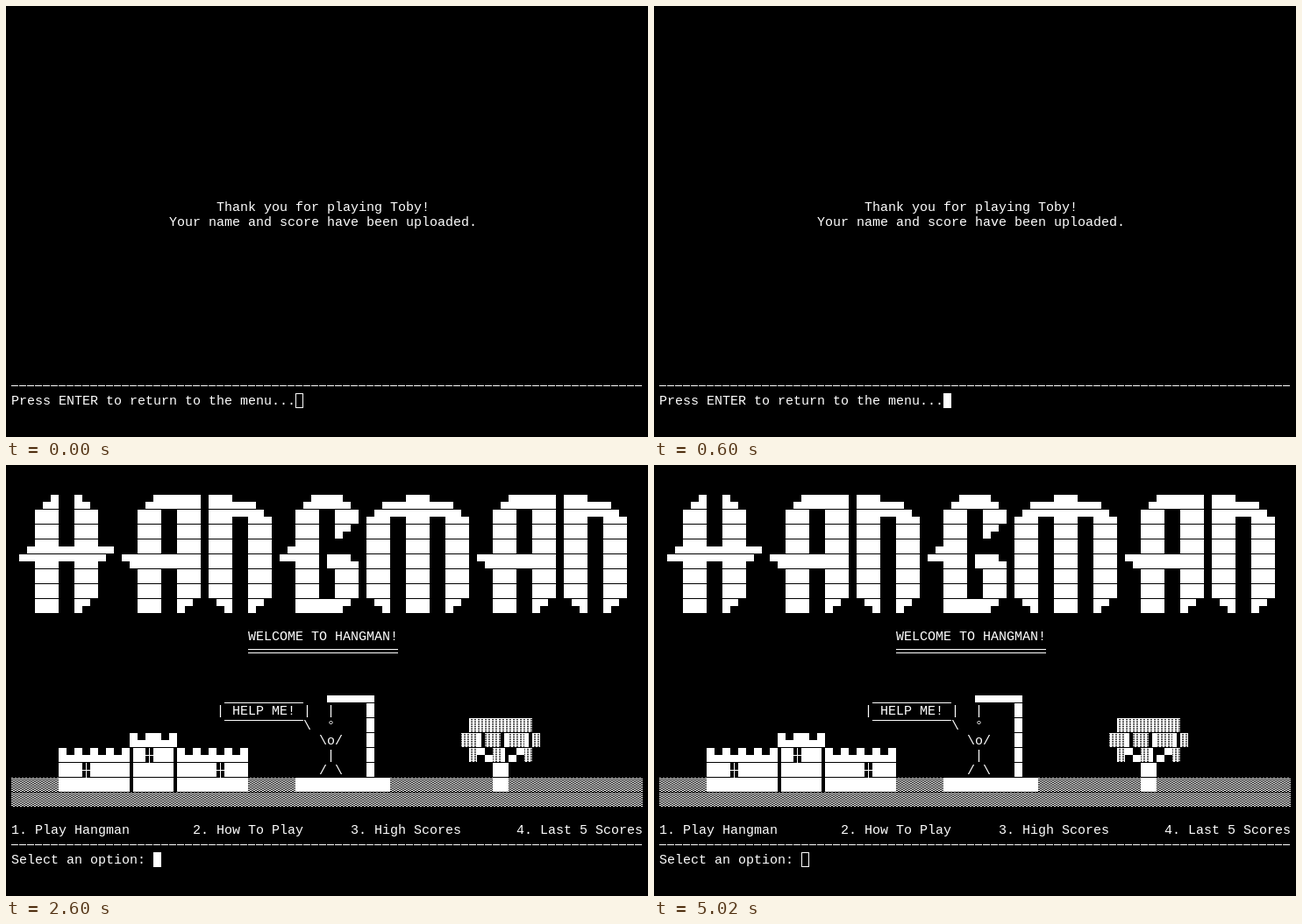
Recreate the animation shown at these times as an HTML page with a canvas. Size 732 by 492 pixels, loop 5.14 s.

```html
<!DOCTYPE html>
<html lang="en">
<head>
<meta charset="utf-8">
<title>Hangman</title>
<style>
html, body { margin: 0; height: 100%; overflow: hidden; background: #000; }
canvas { display: block; }
</style>
</head>
<body>
<canvas width="732" height="492"></canvas>
<script>
const LEFT = 6, CELL_W = 9, CELL_H = 17, LOOP = 5140;
const ctx = document.querySelector('canvas').getContext('2d');

// Drawn characters as [x, y, w, h] boxes; blocks leave a one-pixel seam below
const BLOCKS = {
  '█': [[0, 0, 9, 16]],
  '▀': [[0, 0, 9, 8]],
  '▄': [[0, 8, 9, 8]],
  '▌': [[0, 0, 5, 16]],
  '▐': [[4, 0, 5, 16]],
  '┼': [[0, 8, 9, 1], [4, 0, 1, 17]],
  '_': [[0, 16, 9, 1]],
  '‾': [[0, 2, 9, 1]],
  '-': [[0, 8, 8, 1]],
  '=': [[0, 6, 9, 1], [0, 10, 9, 1]]
};

const H = `
   ▄█  █▄
  ███  ███
  ███  ███
 ▄███▄▄███▄▄
▀▀███▀▀███▀
  ███  ███
  ███  ███
  ███  █▀`;
const A = `
   ▄██████
  ███  ███
  ███  ███
  ███  ███
▀█████████
  ███  ███
  ███  ███
  ███  █▀`;
const N = `
███▄▄▄
███▀▀██▄
███  ███
███  ███
███  ███
███  ███
███  ███
 ▀█  █▀`;
const G = `
   ▄████▄
  ███  ███
  ███  █▀
 ▄███
▀▀███ ███▄
  ███  ███
  ███  ███
  ██████▀`;
const M = `
  ▄▄▄███▄▄▄
▄██▀▀███▀▀██▄
███  ███  ███
███  ███  ███
███  ███  ███
███  ███  ███
███  ███  ███
 ▀█  ███  █▀`;

const CASTLE = `
         █▄██▄█
█▄█▄█▄█▄█▐█┼██▌█▄█▄█▄█▄█
███┼█████▐████▌█████┼███
█████████▐████▌█████████`;
const BUBBLE = `
 __________
| HELP ME! |
 ‾‾‾‾‾‾‾‾‾‾\\`;
const GALLOWS = `
 ▄▄▄▄▄▄
 |    █
 °    █
\\o/   █
 |    █
/ \\   █`;
const TREE = `
 ▓▓▓▓▓▓▓▓
▓▓▌▓▓▐▓▓▌▓
 ▓▀▄▓▌▄▀▓
    ██
    ██`;

// Each item: column, row, text
const RULE = [0, 25, '-'.repeat(80)];
const goodbye = [
  [26, 13, 'Thank you for playing Toby!'],
  [20, 14, 'Your name and score have been uploaded.'],
  RULE,
  [0, 26, 'Press ENTER to return to the menu...']
];
const menu = [
  [1, 2, H], [14, 2, A], [25, 2, N], [34, 2, G], [45, 2, M], [59, 2, A], [70, 2, N],
  [30, 11, 'WELCOME TO HANGMAN!'],
  [30, 12, '='.repeat(19)],
  [6, 18, CASTLE], [26, 15, BUBBLE], [39, 15, GALLOWS], [57, 17, TREE],
  [0, 21, '▒'.repeat(6)], [30, 21, '▒'.repeat(6) + '█'.repeat(12) + '▒'.repeat(13)],
  [63, 21, '▒'.repeat(17)],
  [0, 22, '▒'.repeat(80)],
  [0, 24, '1. Play Hangman'], [23, 24, '2. How To Play'],
  [43, 24, '3. High Scores'], [64, 24, '4. Last 5 Scores'],
  RULE,
  [0, 26, 'Select an option: ']
];

// Staggered dashes for ▒; ▓ also fills every other line
function shade(x, y, dense) {
  for (let j = 0; j < CELL_H - 1; j++)
    for (let i = x; i < x + CELL_W; i++) {
      const dash = (Math.floor(i / 2) + j) % 2;
      if (dash || dense && j % 2 === 0) ctx.fillRect(i, y + j, 1, 1);
    }
}

function drawChar(char, x, y) {
  if (BLOCKS[char]) {
    for (const [bx, by, w, h] of BLOCKS[char]) ctx.fillRect(x + bx, y + by, w, h);
  } else if (char === '▒' || char === '▓') {
    shade(x, y, char === '▓');
  } else {
    ctx.fillText(char, x, y + 13);
  }
}

function drawScreen(items) {
  for (const [col, row, text] of items)
    text.replace(/^\n/, '').split('\n').forEach((line, j) =>
      [...line].forEach((char, i) =>
        drawChar(char, LEFT + (col + i) * CELL_W, (row + j) * CELL_H)));
}

function drawCursor(col, solid) {
  const x = LEFT + col * CELL_W, y = 26 * CELL_H;
  if (solid) ctx.fillRect(x, y, CELL_W, CELL_H);
  else ctx.strokeRect(x + 0.5, y + 0.5, CELL_W - 1, CELL_H - 1);
}

function frame() {
  const t = performance.now() % LOOP;
  const inMenu = t >= 2600;
  ctx.fillStyle = '#000';
  ctx.fillRect(0, 0, 732, 492);
  ctx.fillStyle = ctx.strokeStyle = '#fff';
  ctx.font = '15px "Liberation Mono", "Courier New", monospace';
  drawScreen(inMenu ? menu : goodbye);
  drawCursor(inMenu ? 18 : 36, t >= 600 && t < 5020);
  requestAnimationFrame(frame);
}
frame();
</script>
</body>
</html>
```
